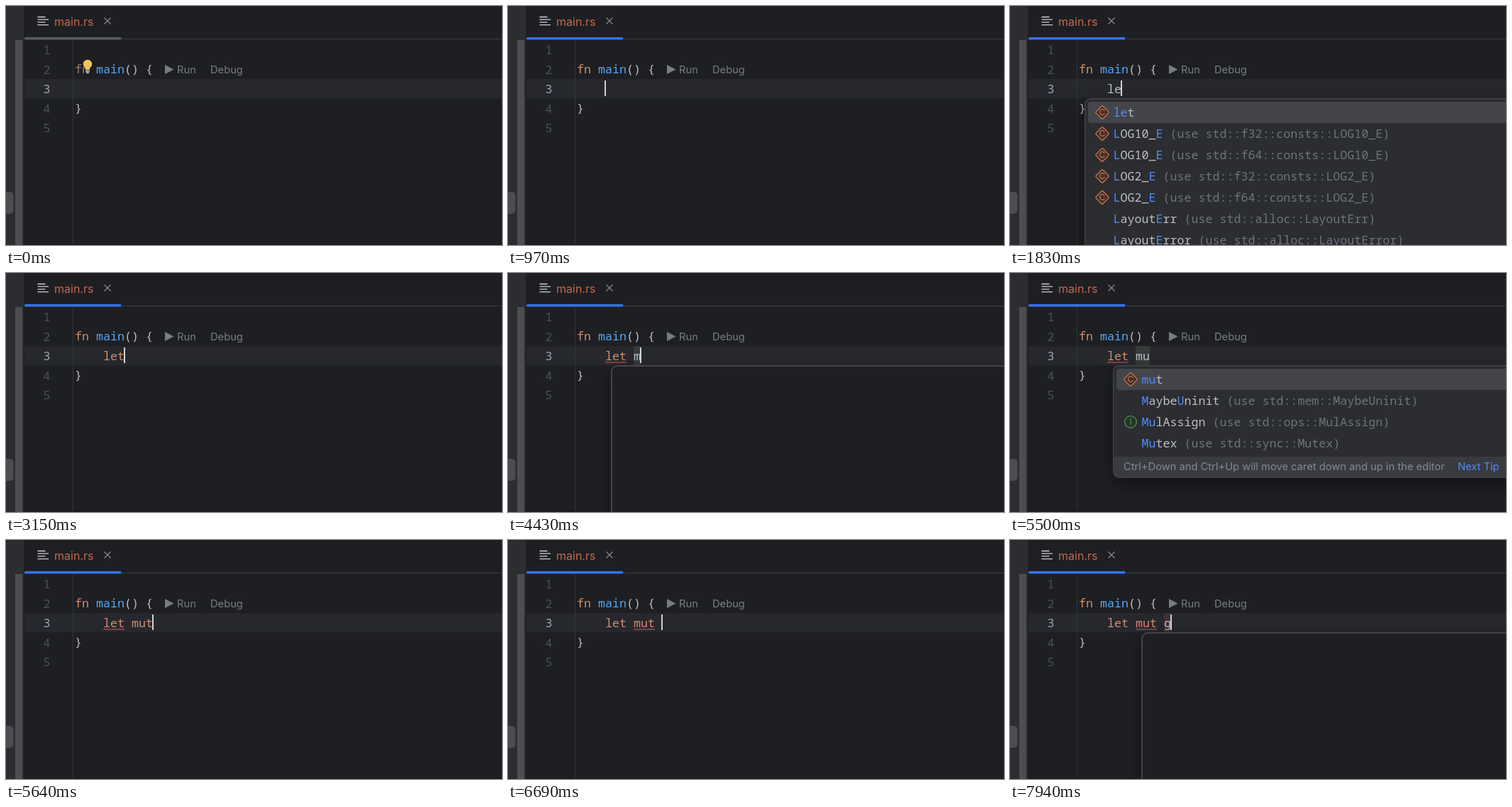
An HTML page that plays this animation: 699 px wide and 337 px high, repeating every 8000 ms.

```html
<!DOCTYPE html>
<html lang="en">
<head>
<meta charset="utf-8">
<title>Typing in an editor</title>
<style>
  html, body { margin: 0; width: 100%; height: 100%; overflow: hidden; background: #1e1f22; }
  svg { display: block; width: 699px; height: 337px; }
  text { white-space: pre; }
  .code { font: 16.667px "Noto Sans Mono", "DejaVu Sans Mono", monospace; fill: #bcbec4; }
  .ui { font: 14.7px Inter, Roboto, sans-serif; fill: #787c84; }
  .key { fill: #cf8e6d; }
  .hit { fill: #548af7; }
  .dim { fill: #6f737a; }
</style>
</head>
<body>
<svg id="stage" viewBox="0 0 699 337"></svg>
<script>
const LOOP = 8000;
const CELL = 10, LEFT = 97;
const col = n => LEFT + n * CELL;
const lineY = n => 68 + (n - 1) * 27.5;

const rect = (x, y, w, h, fill, r = 0) =>
  `<rect x="${x}" y="${y}" width="${w}" height="${h}" rx="${r}" fill="${fill}"/>`;
const stroke = (d, color, w) =>
  `<path d="${d}" fill="none" stroke="${color}" stroke-width="${w}"/>`;
const text = (x, y, s, cls = "code", style = "") =>
  `<text x="${x}" y="${y}" class="${cls}" style="${style}">${s}</text>`;
const span = (cls, s) => `<tspan class="${cls}">${s}</tspan>`;

// Content visible from one time up to another
const during = (from, to, body) =>
  `<g data-from="${from}" data-to="${to}" visibility="hidden">${body}</g>`;

const typed = (n, s, cls = "") => text(col(n), lineY(3), s, "code " + cls);

function squiggle(n, len) {
  let d = `M${col(n)} 127`;
  for (let i = 0; i < len * CELL / 4; i++) d += "l2 -2l2 2";
  return `<svg x="0" y="0" width="${col(n + len)}" height="337">${stroke(d, "#e5535f", 1)}</svg>`;
}

function icon(kind, x, y) {
  const letter = (s, color) =>
    text(x, y + 4.3, s, "ui", `font-size:12px;fill:${color};text-anchor:middle`);
  if (kind === "C")
    return `<rect x="${x - 7}" y="${y - 7}" width="14" height="14" rx="2" fill="#45322b"
      stroke="#d0794c" stroke-width="1.2" transform="rotate(45 ${x} ${y})"/>` + letter("C", "#d0794c");
  if (kind === "I")
    return `<circle cx="${x}" cy="${y}" r="8.3" fill="#253627" stroke="#57965c" stroke-width="1.2"/>`
      + letter("I", "#57965c");
  return "";
}

// [x] marks a matched letter; text after the first space is dimmed
function row(x, y, kind, label) {
  const [name, ...rest] = label.split(" ");
  const marked = name.replace(/\[(\w+)\]/g, (_, s) => span("hit", s));
  const tail = rest.length ? span("dim", " " + rest.join(" ")) : "";
  return icon(kind, x + 25, y) + text(x + 40.5, y + 6, marked + tail);
}

function frame(x, h, fill, border) {
  const box = `x="${x + border / 2}" y="${130 + border / 2}" width="800" height="${h - border}" rx="8"`;
  return `<rect x="${x}" y="138" width="800" height="${h}" rx="8" fill="#000" opacity=".4" filter="url(#blur)"/>`
    + `<rect ${box} fill="${fill}" stroke="#43454a" stroke-width="${border}"/>`;
}

const emptyPopup = x => frame(x, 400, "#1e1f22", 2);

function popup(x, items, h = 400, tip = false) {
  let s = frame(x, h, "#2b2d30", 1.4) + rect(x + 5, 135, 800, 30, "#43454a", 4);
  items.forEach(([kind, label], i) => s += row(x, 150 + i * 30, kind, label));
  if (tip) {
    const top = 259, low = 130 + h - 1;
    s += `<path d="M${x + 1.4} ${top}H700V${low}H${x + 8}Q${x + 1.4} ${low} ${x + 1.4} ${low - 7}Z" fill="#393b40"/>`
      + text(160, 278, "Ctrl+Down and Ctrl+Up will move caret down and up in the editor", "ui", "fill:#868a91")
      + text(631, 278, "Next Tip", "ui hit");
  }
  return s;
}

const leItems = [
  ["C", "[le]t"],
  ["C", "[L]OG10_[E] (use std::f32::consts::LOG10_E)"],
  ["C", "[L]OG10_[E] (use std::f64::consts::LOG10_E)"],
  ["C", "[L]OG2_[E] (use std::f32::consts::LOG2_E)"],
  ["C", "[L]OG2_[E] (use std::f64::consts::LOG2_E)"],
  ["", "[L]ayout[E]rr (use std::alloc::LayoutErr)"],
  ["", "[L]ayout[E]rror (use std::alloc::LayoutError)"]
];
const mItems = [
  ["C", "[m]ut"],
  ["", "[M]anuallyDrop (use std::mem::ManuallyDrop)"],
  ["", "[M]aybeUninit (use std::mem::MaybeUninit)"],
  ["I", "[M]ul (use std::ops::Mul)"],
  ["I", "[M]ulAssign (use std::ops::MulAssign)"],
  ["", "[M]utex (use std::sync::Mutex)"],
  ["", "[M]utexGuard (use std::sync::MutexGuard)"]
];
const muItems = [
  ["C", "[mu]t"],
  ["", "[M]aybe[U]ninit (use std::mem::MaybeUninit)"],
  ["I", "[Mu]lAssign (use std::ops::MulAssign)"],
  ["", "[Mu]tex (use std::sync::Mutex)"]
];

// from, to, column
const carets = [
  [910, 1700, 4], [1700, 1770, 5], [1770, 2420, 6], [2950, 3150, 6], [3150, 3810, 7],
  [3810, 4360, 8], [4360, 4700, 9], [4700, 5500, 10], [5640, 6690, 11], [6690, 7880, 12], [7880, LOOP, 13]
];

const mark = (n, len, fill) => rect(col(n), 103, len * CELL, 27, fill);
const tabLine = color => rect(26, 44, 136.5, 3.5, color, 1.75);

const chrome =
  rect(0, 0, 699, 337, "#1e1f22") + rect(0, 0, 25, 337, "#2b2d30")
  + rect(13, 48, 10, 289, "#4d4e51")
  + rect(-6, 262, 16.5, 31, "#4b4d51", 5)
  + rect(25, 46, 674, 1, "#393b40")
  + rect(26, 103, 673, 27, "#26282e")
  + rect(94, 48, 1, 289, "#313438")
  + rect(25, 336, 674, 1, "#18191b")
  + stroke("M44.5 15.5h11M44.5 19.2h15.5M44.5 22.9h11M44.5 26.6h15.5", "#ced0d6", 1.3)
  + text(68, 28, "main.rs", "ui", "font-size:16px;fill:#c4694f")
  + stroke("M138.5 16.5l9 9m0 -9l-9 9", "#868a91", 1.2)
  + [1, 2, 3, 4, 5].map(n =>
      text(52.5, lineY(n), n, "code", `fill:${n === 3 ? "#a1a3ab" : "#4b5059"}`)).join("")
  + text(col(3), lineY(2) - .5, `<tspan fill="#56a8f5">main</tspan>() {`)
  + `<path d="M224 83L236.5 89.5L224 96Z" fill="#787c84"/>`
  + text(241, 95, "Run", "ui") + text(288, 95, "Debug", "ui")
  + text(col(0), lineY(4) - .5, "}");

const bulb =
  `<circle cx="115" cy="82" r="6.2" fill="#f2c55c"/>`
  + rect(112, 86, 6, 4, "#f2c55c")
  + rect(112, 91, 6, 1.5, "#ced0d6") + rect(113, 93.5, 4, 1.5, "#ced0d6");

const beam = stroke("M-4 -10.5h3l1 1l1 -1h3M0 -9.5v19M-4 10.5h3l1 -1l1 1h3", "#e6e6e6", 1.4);

const parts = [
  `<defs><filter id="blur" x="-20%" y="-30%" width="140%" height="160%"><feGaussianBlur stdDeviation="11"/></filter></defs>`,
  chrome,
  during(0, 910, tabLine("#5a5d66") + text(col(0), lineY(2) - .5, "fn", "code", "fill:#957b6e") + bulb),
  during(910, LOOP, tabLine("#3574f0") + text(col(0), lineY(2) - .5, "fn", "code key")),

  during(4360, 4700, mark(8, 1, "#373b39")),
  during(4700, 5640, mark(8, 2, "#373b39")),
  during(7880, LOOP, mark(12, 1, "#402f33")),

  during(1700, 1770, typed(4, "l")),
  during(1770, 3150, typed(4, "le")),
  during(3150, LOOP, typed(4, "let", "key")),
  during(4360, 4700, typed(8, "m")),
  during(4700, 5640, typed(8, "mu")),
  during(5640, LOOP, typed(8, "mut", "key")),
  during(7880, LOOP, typed(12, "g")),
  during(3810, 6220, squiggle(4, 3)),
  during(6220, LOOP, squiggle(8, 3)),

  during(1770, 1830, emptyPopup(105)),
  during(1830, 3150, popup(105, leItems)),
  during(4430, 4520, emptyPopup(145)),
  during(4520, 4790, popup(145, mItems)),
  during(4790, 4880, popup(145, muItems)),
  during(4880, 4970, popup(145, muItems, 130)),
  during(4970, 5640, popup(145, muItems, 159, true)),
  during(7940, LOOP, emptyPopup(185)),

  ...carets.map(([from, to, n]) => during(from, to, rect(col(n) - 1, 105, 2, 22, "#ced0d6"))),
  during(150, 970, `<g id="pointer">${beam}</g>`)
];

const stage = document.getElementById("stage");
stage.innerHTML = parts.join("");
const timed = [...stage.querySelectorAll("[data-from]")].map(el =>
  ({ el, from: +el.dataset.from, to: +el.dataset.to }));
const pointer = document.getElementById("pointer");

function movePointer(t) {
  const step = Math.max(0, Math.min(8, Math.floor((t - 150) / 70)));
  const left = (1 - step / 8) ** 2;
  pointer.setAttribute("transform", `translate(${194 + 165 * left} ${127 + 126 * left})`);
}

function draw(now) {
  const t = now % LOOP;
  for (const { el, from, to } of timed)
    el.setAttribute("visibility", t >= from && t < to ? "visible" : "hidden");
  movePointer(t);
}

const start = performance.now();
function tick() {
  draw(performance.now() - start);
  requestAnimationFrame(tick);
}
tick();
</script>
</body>
</html>
```
